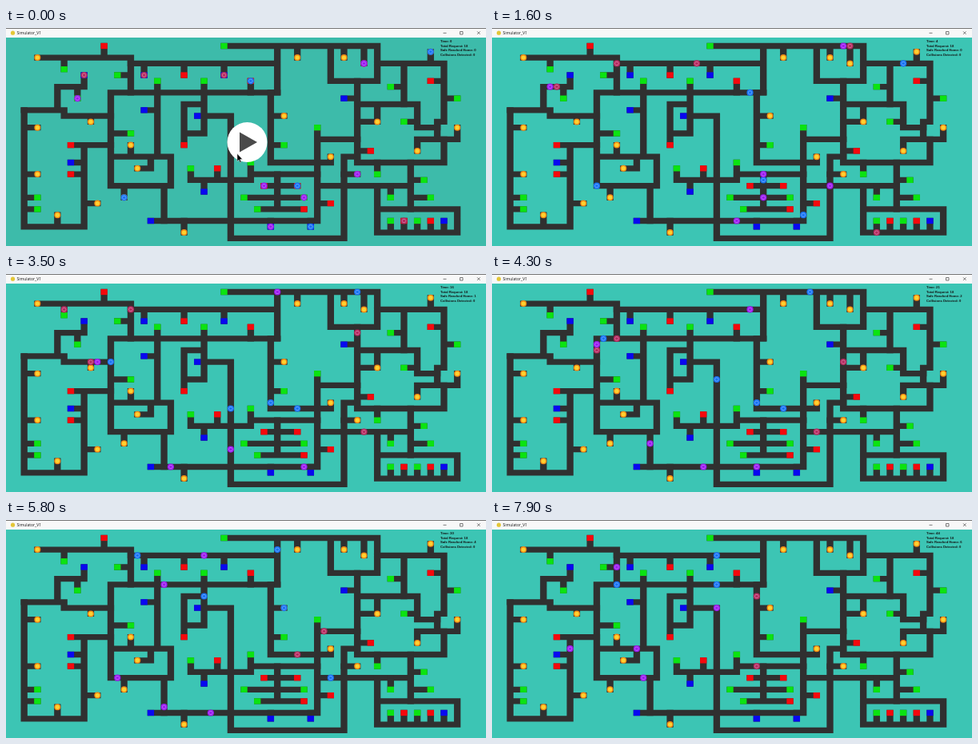
These frames come from a looping animation (600x273 px, 8000 ms). An HTML page with a canvas:

```html
<!DOCTYPE html>
<html lang="en">
<head>
<meta charset="utf-8">
<title>Simulator_V1</title>
<style>
html, body { margin: 0; width: 100%; height: 100%; overflow: hidden; }
canvas { display: block; width: 600px; height: 273px; }
</style>
</head>
<body>
<canvas id="stage" width="600" height="273"></canvas>
<script>
const ctx = document.getElementById('stage').getContext('2d');
const LOOP = 8000, START = 940, TICK = 158;
const CELL_W = 8.33, CELL_H = 7.3, LEFT = 6, TOP = 22.5;
const px = c => LEFT + c * CELL_W;
const py = r => TOP + r * CELL_H;

// Corridors in grid units, by region
const roads = [
  // north-west
  'M4 2H18V8M14 0V2M8 2V4M16 5H18M11 5V7H7V11M10 7V9M2 11H8V12H15M12 12V13',
  // west block
  'M2 11V31H11V17M2 14H4M2 22H4M2 26H4M2 28H4M7 29V31M9 17H15M9 20H11M9 22H11M11 27H13',
  // inner west
  'M40 8H15V24H24V19H15M15 15H18M18 17V19M19 21H21V19M17 24V26M22 6V19M20 11H22M23 24V30',
  // north
  'M18 3H40M20 3V5M26 3V5M32 3V5M36 6V8M32 0H55V6H48V0M40 0V8M43 0V2M50 0V2M53 0V3',
  // middle
  'M29 6V15H26M26 17V10H29M28 12H33V33H50V19H52M27 21V23H36M31 21V23M29 23V25M36 20V23M36 22H46',
  'M39 8V20H48V19M39 12H41M39 17H41M46 14V30H21M46 16H52M40 22V28M38 24H43M35 26H44M37 28H44',
  'M46 27H48M26 30V32M39 30V31M45 30V31M46 24H60M50 22H52',
  // east
  'M55 3H65V13H64V16M63 1V3M59 3V10M57 7H59M63 6H65M65 9H67M52 6V20H65V16M50 9H52M52 18H54',
  'M52 10H61V14H64M55 10V13H52M59 13H61M61 18V16H67V14M55 20V22M60 20V28M60 23H62M60 26H63M57 24V26',
  'M55 24V32H67V28H55M57 30V32M59 30V32M61 30V32M63 30V32M65 30V32'
].map(d => new Path2D(d));

const cells = s => s.split(' ').map(p => p.split(',').map(Number));
const blocks = {
  '#0be311': cells('8,4 16,5 10,9 4,26 4,28 18,15 22,6 29,6 32,0 27,21 36,20 41,17 46,14 35,26 37,28 44,26 57,7 67,9 59,13 55,22 62,23 57,26 63,26 57,30 61,30'),
  '#f5080c': cells('14,0 26,5 36,6 9,17 9,22 26,17 31,21 38,24 43,24 44,28 48,27 63,6 54,18 59,30 63,30'),
  '#0808f0': cells('11,5 20,5 32,5 20,11 28,12 9,20 29,25 21,30 39,31 45,31 50,9 65,30')
};
const suns = cells('4,2 4,14 4,22 12,13 7,29 13,27 18,17 19,21 17,26 26,32 41,12 43,2 50,2 53,3 63,1 55,13 67,14 61,18 48,19 52,22');

// Each agent: tint, first cell, then moves (W waits)
const RED = '#b5285f', PURPLE = '#9a18f0', BLUE = '#1672f5';
const steps = { U: [0, -1], D: [0, 1], L: [-1, 0], R: [1, 0], W: [0, 0] };
const agents = [
  [RED, 20, 5, 'U2L2U1L10D2'],
  [RED, 32, 5, 'U2L14D5R4U2'],
  [RED, 53, 3, 'W1U3R2D6L3D10L6D6L9'],
  [PURPLE, 53, 3, 'U3L13D3L16W1L6D5'],
  [BLUE, 63, 1, 'D2L8U3L15D8W1L9'],
  [RED, 11, 5, 'D2L4D4R1D1R7U4R3U3'],
  [PURPLE, 10, 9, 'U2L3D4R1D1R7U4R14D4R4D9'],
  [BLUE, 36, 6, 'D2R3D12R7D4R4U2R2'],
  [BLUE, 17, 26, 'U2L2U16R3W1U5R16'],
  [BLUE, 43, 24, 'L3U2L4D1L3U11L4U4W1L13'],
  [PURPLE, 38, 24, 'R2U2L4D1L3D7L10U6R1U5L5'],
  [BLUE, 45, 31, 'W1U1R1U10L7U8R2'],
  [PURPLE, 52, 22, 'L2D2L4D6L23U6L8'],
  [RED, 59, 30, 'D2L4U8L9U4L7U12'],
  [PURPLE, 39, 31, 'U1L16U6L8U7L4D5'],
  [PURPLE, 44, 26, 'L4U2L2']
].map(([tint, c, r, moves]) => {
  const route = [[c, r]];
  for (const [, dir, n] of moves.matchAll(/([A-Z])(\d+)/g)) {
    for (let i = 0; i < n; i++) route.push([c += steps[dir][0], r += steps[dir][1]]);
  }
  return { tint, route };
});

function disc(x, y, r, fill) {
  ctx.fillStyle = fill;
  ctx.beginPath();
  ctx.arc(x, y, r, 0, 7);
  ctx.fill();
}

function label(text, x, y, font) {
  ctx.font = font;
  ctx.fillStyle = '#111';
  ctx.fillText(text, x, y);
}

function drawWindow() {
  ctx.fillStyle = '#f8f8f8';
  ctx.fillRect(0, 0, 600, 12);
  ctx.fillStyle = '#555';
  ctx.fillRect(0, 0, 600, 0.8);
  disc(8.5, 6.2, 2.6, '#e3c738');
  label('Simulator_V1', 13.5, 8, '5px "Open Sans", sans-serif');
  ctx.strokeStyle = '#444';
  ctx.lineWidth = 0.7;
  ctx.beginPath();
  ctx.moveTo(546.5, 6.3); ctx.lineTo(550.5, 6.3);
  ctx.rect(567.5, 4.5, 3.5, 3.5);
  ctx.moveTo(589, 4.3); ctx.lineTo(592.6, 7.9);
  ctx.moveTo(592.6, 4.3); ctx.lineTo(589, 7.9);
  ctx.stroke();
}

function drawMap() {
  ctx.save();
  ctx.transform(CELL_W, 0, 0, CELL_H, LEFT, TOP);
  ctx.strokeStyle = '#303030';
  ctx.lineWidth = 1;
  ctx.lineCap = 'square';
  roads.forEach(d => ctx.stroke(d));
  ctx.restore();
  for (const color in blocks) {
    ctx.fillStyle = color;
    for (const [c, r] of blocks[color]) {
      ctx.fillRect(px(c) - CELL_W / 2, py(r) - CELL_H / 2, CELL_W, CELL_H);
    }
  }
  for (const [c, r] of suns) {
    disc(px(c), py(r), 4, '#f58a12');
    disc(px(c), py(r), 2.7, '#ffd030');
  }
}

function drawAgent(tint, [c, r]) {
  const x = px(c), y = py(r);
  disc(x, y, 4.1, tint);
  ctx.strokeStyle = 'rgba(255,255,255,.45)';
  ctx.lineWidth = 0.7;
  ctx.beginPath();
  for (let i = 0; i < 6; i++) {
    ctx.lineTo(x + 2.4 * Math.cos(i * Math.PI / 3), y + 2.4 * Math.sin(i * Math.PI / 3));
  }
  ctx.closePath();
  ctx.stroke();
}

function drawStatus(tick, safe) {
  ['Time: ' + tick, 'Total Request: 18', 'Safe Reached Home: ' + safe, 'Collisions Detected: 0']
    .forEach((s, i) => label(s, 543, 18.2 + i * 5.6, 'bold 4.15px "Liberation Sans", Arial, sans-serif'));
}

function drawPlayer(t) {
  const alpha = t < 800 ? 1 - t / 8000 : Math.max(0, 0.9 - (t - 800) / 550);
  ctx.globalAlpha = alpha;
  disc(301.5, 143, 25, '#fff');
  ctx.fillStyle = '#4a4a4a';
  ctx.beginPath();
  ctx.moveTo(292, 130.5); ctx.lineTo(314, 143); ctx.lineTo(292, 155.5);
  ctx.fill();
  ctx.globalAlpha = 1;
}

function drawPointer(t) {
  if (t >= 1400) return;
  const k = Math.min(1, t / 900);
  ctx.save();
  ctx.translate(289 + 4.5 * k, 157.5 - 7.5 * k);
  ctx.fillStyle = '#000';
  ctx.strokeStyle = '#ddd';
  ctx.lineWidth = 0.5;
  ctx.beginPath();
  [[0, 0], [0, 9.5], [2.1, 7.6], [3.6, 11], [5, 10.3], [3.6, 7.1], [6.4, 6.8]]
    .forEach(p => ctx.lineTo(...p));
  ctx.closePath();
  ctx.fill();
  ctx.stroke();
  ctx.restore();
}

function draw(now) {
  const t = now % LOOP;
  const tick = Math.max(0, Math.floor((t - START) / TICK));
  ctx.fillStyle = t < 100 ? '#3dbbaa' : '#3cc5b4';
  ctx.fillRect(0, 0, 600, 273);
  drawWindow();
  drawMap();
  let safe = 0;
  for (const { tint, route } of agents) {
    if (tick < route.length) drawAgent(tint, route[tick]);
    else safe++;
  }
  drawStatus(tick, safe);
  drawPlayer(t);
  drawPointer(t);
  requestAnimationFrame(draw);
}
requestAnimationFrame(draw);
</script>
</body>
</html>
```
